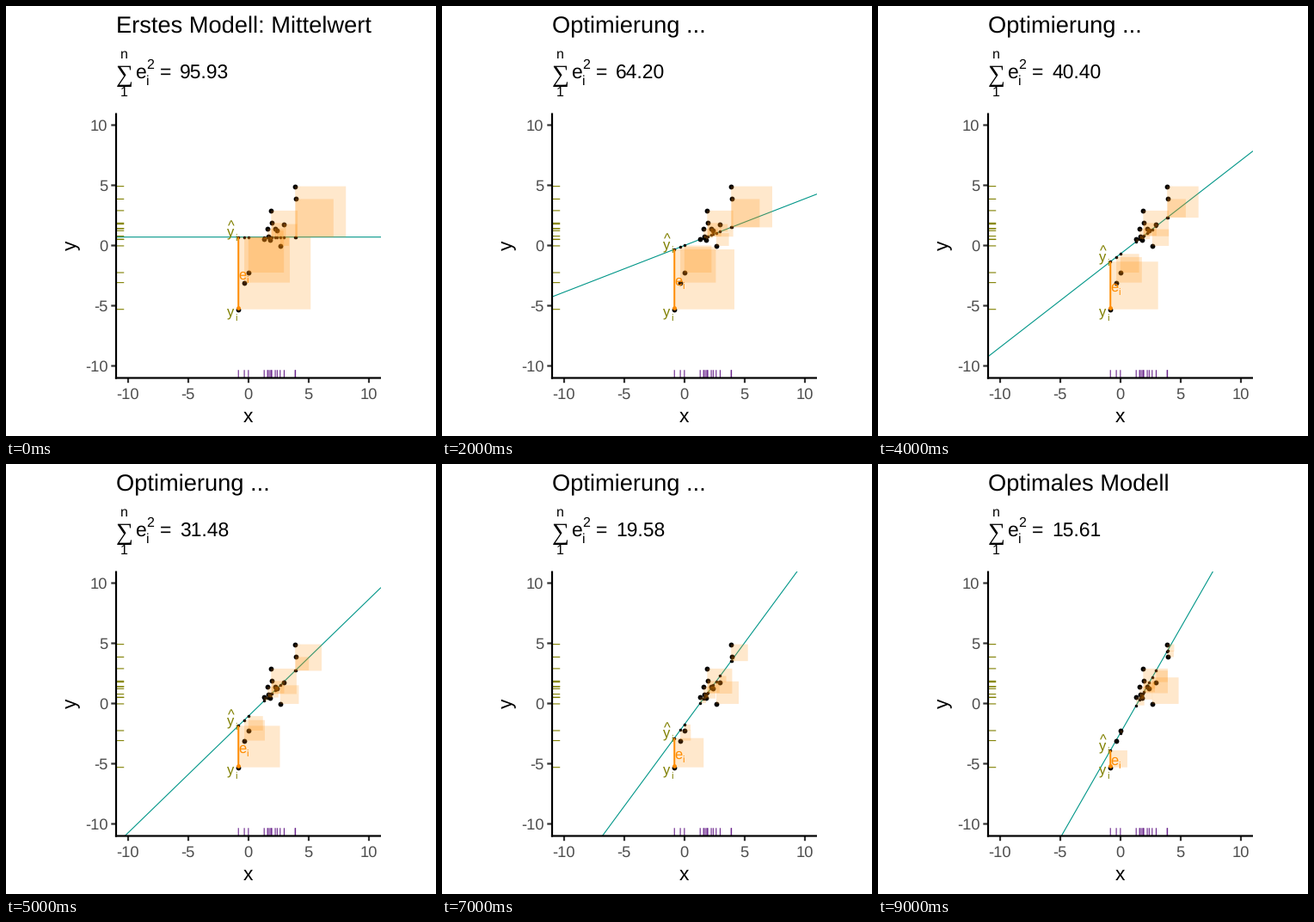
Recreate the animation shown at these times as a matplotlib script. Size 500x500 px, loop 10 s.

```python
import numpy as np
import matplotlib.pyplot as plt
from matplotlib.animation import FuncAnimation
from matplotlib.patches import Rectangle

plt.rcParams["font.family"] = "Liberation Sans"
plt.rcParams["text.hinting"] = "none"

SIZE, DPI, STEPS = 500, 100, 10
PT = 72 / DPI                       # points per pixel
LEFT, RIGHT, TOP, BOTTOM = 128, 436, 124.5, 432.5
UNIT = 14                           # pixels per data unit
RUG, TICK, THICK, THIN = 9.24, 5.7, 2.2, 1.1
ORANGE, OLIVE, TEAL, PURPLE = "#FF8C00", "#808000", "#009688", "#68228B"

points = [(-0.84, -5.30), (-0.35, -3.08), (-0.01, -2.25), (1.30, 0.52),
          (1.58, 1.40), (1.64, 0.78), (1.78, 0.50), (1.88, 2.90),
          (1.93, 1.87), (2.22, 1.42), (2.38, 1.23), (2.63, -0.03),
          (2.96, 1.78), (3.87, 4.92), (3.90, 3.86)]
xs, ys = np.array(points).T
best_slope = np.polyfit(xs, ys, 1)[0]


def px(x):
    return (LEFT + RIGHT) / 2 + UNIT * np.asarray(x)


def py(y):
    return (TOP + BOTTOM) / 2 - UNIT * np.asarray(y)


fig = plt.figure(figsize=(SIZE / DPI, SIZE / DPI), dpi=DPI, facecolor="white")
ax = fig.add_axes([0, 0, 1, 1])
ax.set(xlim=(0, SIZE), ylim=(SIZE, 0))
ax.axis("off")


def line(x, y, color, width, z):
    return ax.plot(x, y, color=color, lw=width * PT, zorder=z, snap=False,
                   solid_capstyle="butt")[0]


def text(x, y, s, size, color="black", ha="left", **kw):
    return ax.text(x, y, s, fontsize=size * PT, color=color, ha=ha,
                   zorder=8, **kw)


def dots(x, y, radius, color, z):
    return ax.scatter(x, y, s=(2 * radius * PT) ** 2, color=color,
                      linewidths=0, zorder=z, snap=False)


def indexed(s, x, color, hat=False):
    """Letter with subscript i; returns a function that sets its baseline."""
    parts = [(text(x, 0, s, 16.5, color), 0),
             (text(x + 8.7, 0, "i", 11.5, color), 4.3)]
    if hat:
        parts.append((text(x + 0.4, 0, "^", 16.5, color), -6.6))

    def place(y):
        for part, dy in parts:
            part.set_y(y + dy)
    return place


# Axes
line([LEFT, LEFT], [TOP, BOTTOM + THIN], "black", THICK, 9)
line([LEFT - THIN, RIGHT], [BOTTOM, BOTTOM], "black", THICK, 9)
for v in range(-10, 11, 5):
    line([LEFT - TICK, LEFT], [py(v)] * 2, "#333333", THICK, 8.5)
    line([px(v)] * 2, [BOTTOM, BOTTOM + TICK], "#333333", THICK, 8.5)
    text(118.3, py(v) + 6.6, str(v), 18.33, "#4D4D4D", "right")
    text(px(v) - 0.3, 457, str(v), 18.33, "#4D4D4D", "center")
text(281.5, 484.5, "x", 22.9, ha="center")
text(75, 278.5, "y", 22.9, ha="center", va="center", rotation=90)

# Rugs
for x, y in zip(px(xs), py(ys)):
    line([x, x], [BOTTOM - RUG, BOTTOM], PURPLE, THIN, 6)
    line([LEFT, LEFT + RUG], [y, y], OLIVE, THIN, 6)

# Heading
title = text(LEFT, 31, "", 27.25)
text(LEFT, 88, "\u2211", 28, family="Liberation Serif")
text(137.5, 61, "n", 16, ha="center")
text(137.5, 105, "1", 16, ha="center")
text(149.6, 84, "e", 22.9)
text(162.8, 73, "2", 16)
text(162.8, 92.5, "i", 16)
text(178.7, 84, "=", 22.9)
total = text(202, 84, "", 22.9)

# Model, points and squares
model = line([], [], TEAL, THIN, 2)
model.set_clip_path(Rectangle((LEFT, TOP), RIGHT - LEFT, BOTTOM - TOP,
                              transform=ax.transData))
dots(px(xs), py(ys), 2.9, "black", 3)
fits = dots(px(xs), py(ys), 1.75, "black", 3)
squares = [ax.add_patch(Rectangle((0, 0), 0, 0, fc=ORANGE, alpha=0.2, lw=0,
                                  snap=False, zorder=4)) for _ in xs]

# Labelled residual
x0, y0 = px(xs[0]), py(ys[0])
residual = line([], [], ORANGE, 2, 5)
dots([x0], [y0 - 1.5], 2.4, ORANGE, 5)
indexed("y", 257.2, OLIVE)(y0 + 9)
place_fit = indexed("y", 257.2, OLIVE, hat=True)
place_error = indexed("e", 270.6, ORANGE)


def draw(k):
    t = k / (STEPS - 1)
    slope = best_slope * t
    base = ys.mean() - slope * xs.mean()
    fit = base + slope * xs

    title.set_text("Erstes Modell: Mittelwert" if k == 0 else
                   "Optimales Modell" if k == STEPS - 1 else
                   "Optimierung ...")
    # squared error falls along a parabola to its minimum
    total.set_text(f"{15.614 + 80.314 * (1 - t) ** 2:.2f}")

    ends = np.array([-11, 11])
    model.set_data(px(ends), py(base + slope * ends))
    fits.set_offsets(np.column_stack([px(xs), py(fit)]))
    for sq, x, y, f in zip(squares, xs, ys, fit):
        side = UNIT * abs(y - f)
        sq.set_bounds(px(x), py(max(y, f)), side, side)

    yf = py(fit[0])
    residual.set_data([x0, x0], [yf, y0])
    place_fit(yf)
    place_error((yf + y0) / 2 + 7)
    return []


anim = FuncAnimation(fig, draw, frames=STEPS, interval=1000,
                     init_func=lambda: draw(0), repeat=True)
plt.show()
```
